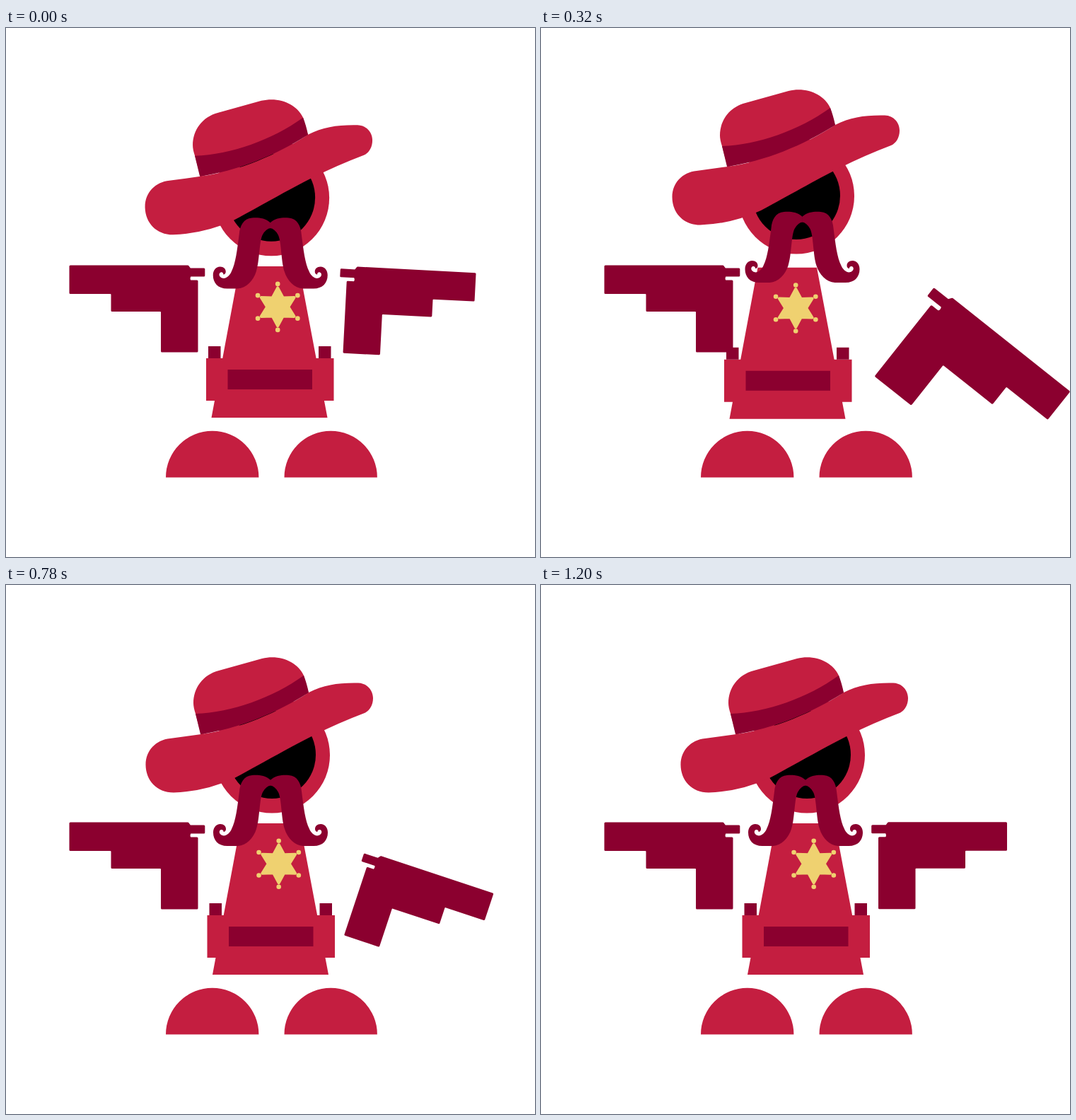
Write an HTML page that moves like this. It is 748 px wide and 748 px high and loops after 1.22 s.

```html
<!DOCTYPE html>
<html lang="en">
<head>
<meta charset="utf-8">
<title>Sheriff</title>
<style>
  html, body { margin: 0; width: 100%; height: 100%; overflow: hidden; background: #fff; }
  svg { display: block; width: 100%; height: 100%; fill: #c41e40; }
  .dark { fill: #8b002f; }
  .gun { stroke: #8b002f; stroke-width: 3; stroke-linejoin: round; }
  .star { fill: #efd170; }
  .star polygon { stroke: #efd170; stroke-width: 4; stroke-linejoin: round; }
</style>
</head>
<body>
<svg viewBox="0 0 748 748">
  <defs>
    <path id="gun" class="dark gun" d="M91 337H257L260 341H279.800V350H260.500Q257.500 354.500 260.500 358H270V457H220.500V402Q220.500 399.500 218 399.500H150V377Q150 374.500 147.500 374.500H91Z"/>
    <path id="whisker" class="dark" d="M374.300 276C366 268 354 268.500 348 269C336 270 331 280 330 292C327 315 325 333 319 345C316 352 309 357 304 353C301 351 301 347 304 346C306 345.500 308 347 307.500 349C310 349 311 347 311 345C311 341 308 338 303 338C297 338 293 343 293 350C293 361 300 369 313 369H328C340 368 350 358 354 345C359 330 358 303 363 293Q368 284 374.300 283.500Z"/>
  </defs>

  <path d="M226 635.500a65.700 65.700 0 0 1 131.400 0zM393.500 635.500a65.700 65.700 0 0 1 131.400 0z"/>
  <use href="#gun"/>

  <g id="body">
    <path d="M332 337H415.500L456 551H292ZM284.500 467H465V527H284.500Z"/>
    <path class="dark" d="M315 483H434.500V511H315ZM287.500 450H305V467H287.500ZM443.500 450H461V467H443.500Z"/>
    <g id="star" class="star"></g>
  </g>

  <g id="head">
    <circle cx="376" cy="240.500" r="82"/>
    <circle cx="376" cy="240" r="62" fill="#000"/>
  </g>

  <g id="hat">
    <path d="M507 181Q470 195 434 213C400 230 355 256 323 273Q282 292 237 293.500C213 293.500 197.500 276 197.500 254C197.500 234 212 219 232 217L276 211C330 204 385 180 428 152C450 141 470 138 498 138.500C511 139 519 149 519 160C519 170 514 178 507 181Z"/>
    <path d="M276 212L268 182Q265 173 265 167C265 146 278 127 301 121L362 104C388 98 412 109 421 128L428 153Z"/>
    <path class="dark" d="M268 182C320 180 376 160 421 128Q425 138 428 152C385 180 327 204 275 211Z"/>
  </g>

  <g id="moustache">
    <use href="#whisker"/>
    <use href="#whisker" transform="matrix(-1 0 0 1 748 0)"/>
  </g>

  <g id="rightGun"><use href="#gun" transform="matrix(-1 0 0 1 748.500 -.3)"/></g>
</svg>

<script>
const STEP = 20, LOOP = 1220;
const PIVOT = [484.5, 426];
const el = id => document.getElementById(id);

function drawStar(cx, cy) {
  const at = (r, i) => [cx + r * Math.sin(i * Math.PI / 6), cy - r * Math.cos(i * Math.PI / 6)];
  const tips = [...Array(12).keys()];
  const points = tips.map(i => at(i % 2 ? 15 : 27, i).join()).join(' ');
  const dots = tips.filter(i => i % 2 == 0).map(i => {
    const [x, y] = at(32.5, i);
    return `<circle cx="${x}" cy="${y}" r="3.3"/>`;
  });
  el('star').innerHTML = `<polygon points="${points}"/>${dots.join('')}`;
}

// Linear interpolation through [step, value] pairs
function track(n, ...keys) {
  const i = keys.findIndex(k => k[0] >= n);
  if (i < 0) return keys[keys.length - 1][1];
  if (i == 0) return keys[0][1];
  const [a, from] = keys[i - 1], [b, to] = keys[i];
  return from + (to - from) * (n - a) / (b - a);
}

function move(id, x, y, rest = '') {
  el(id).setAttribute('transform', `translate(${x} ${y}) ${rest}`);
}

function render(time) {
  const n = Math.floor(time % LOOP / STEP) + 1;
  const lean = track(n, [0, 0], [17, 1], [30, 0]);
  const tip = track(n, [0, 0], [13, 1], [17, 1], [30, 0]);
  move('body', -25.5 * lean, 1.7 * lean);
  move('head', -15 * lean, -3 * lean);
  move('moustache', -4.5 * lean, -9 * lean);
  move('hat', -12 * tip, -15 * tip);

  const x = track(n, [0, 0], [7, 7.9], [17, 19.8], [22, 12.8], [30, -13], [43, 17.9], [56, 0]);
  const y = track(n, [0, 0], [7, 13.1], [17, 40.5], [22, 35], [30, 13.1], [43, 49.6], [56, 0]);
  const angle = track(n, [0, 0], [13, 38.5], [17, 38.5], [61, 0]);
  const size = track(n, [7, 1], [17, 1.264], [28.4, 1]);
  const [px, py] = PIVOT;
  move('rightGun', px + x, py + y, `rotate(${angle}) scale(${size}) translate(${-px} ${-py})`);
}

drawStar(385.7, 394.3);
const start = performance.now();
function tick() {
  render(performance.now() - start);
  requestAnimationFrame(tick);
}
tick();
</script>
</body>
</html>
```
